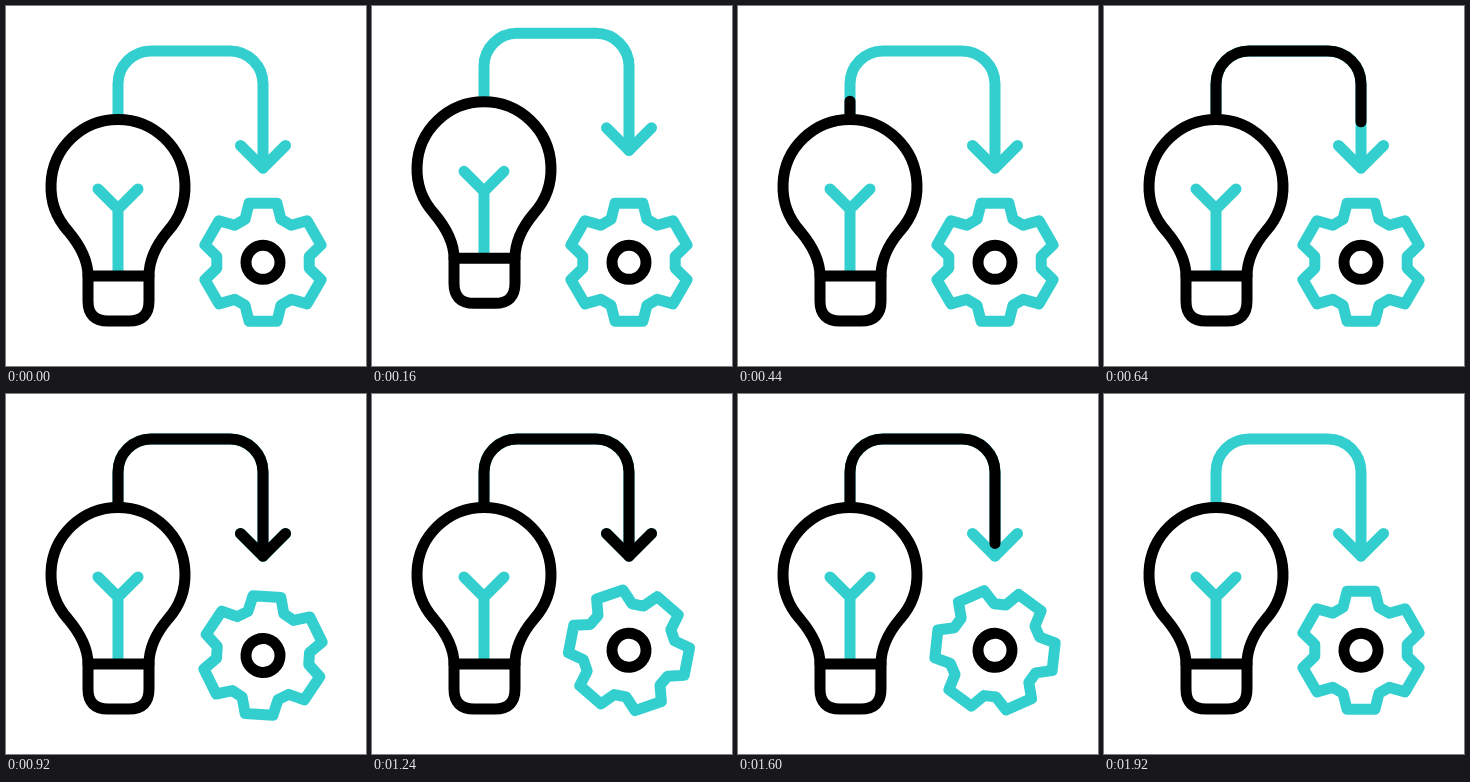
An HTML page with a canvas that plays this animation: 360 px wide and 360 px high, repeating every 2000 ms.

```html
<!DOCTYPE html>
<html lang="en">
<head>
<meta charset="utf-8">
<title>Idea to action</title>
<style>
html, body { margin: 0; width: 100%; height: 100%; overflow: hidden; background: #fff; }
canvas { display: block; width: 100vw; height: 100vh; }
</style>
</head>
<body>
<canvas id="stage"></canvas>
<script>
const SIZE = 360, LOOP = 2000, STEP = 40;
const TEAL = '#33cfcf', BLACK = '#000';
const canvas = document.getElementById('stage');
const ctx = canvas.getContext('2d');
const scale = window.devicePixelRatio || 1;
canvas.width = canvas.height = Math.round(SIZE * scale);

const bulb = new Path2D('M82 270C82 253 73 238 62 225A67 67 0 1 1 162 225C151 238 143 253 143 270');
const base = new Path2D('M82 270V295Q82 315 102 315H123Q143 315 143 295V270Z');
const filament = new Path2D('M112 268V203M92 183L112 203L132 183');
const wire = new Path2D('M112 108V78A33 33 0 0 1 145 45H224A33 33 0 0 1 257 78V162');
const wireLength = 30 + 33 * Math.PI + 79 + 84;
const gear = makeGear(6);

function makeGear(teeth) {
  const path = new Path2D();
  const corners = [[46.6, -22.7], [60.6, -13.3], [60.6, 13.3], [46.6, 22.7]];
  for (let i = 0; i < teeth; i++) {
    for (const [r, deg] of corners) {
      const a = (i * 360 / teeth + deg) * Math.PI / 180;
      path.lineTo(r * Math.sin(a), -r * Math.cos(a));
    }
  }
  path.closePath();
  return path;
}

// Eased 0..1 progress between two times
function ease(t, from, to) {
  const x = Math.min(1, Math.max(0, (t - from) / (to - from)));
  return x * x * (3 - 2 * x);
}

// Rises from a to b, then falls back from b to c
const pulse = (t, a, b, c) => ease(t, a, b) - ease(t, b, c);

function stroke(path, color) {
  ctx.strokeStyle = color;
  ctx.stroke(path);
}

function drawHead(amount, color) {
  if (amount <= 0) return;
  const d = 22.5 * amount;
  const head = new Path2D();
  head.moveTo(257 - d, 162 - d);
  head.lineTo(257, 162);
  head.lineTo(257 + d, 162 - d);
  stroke(head, color);
}

function drawArrow(t) {
  const line = ease(t, 400, 720) - ease(t, 1560, 1880);
  const head = ease(t, 720, 800) - ease(t, 1480, 1560);
  stroke(wire, TEAL);
  drawHead(1, TEAL);
  if (line > 0.001) {
    if (line < 1) ctx.setLineDash([line * wireLength, 1000]);
    stroke(wire, BLACK);
    ctx.setLineDash([]);
  }
  drawHead(head, BLACK);
}

function drawGear(t) {
  ctx.save();
  ctx.translate(257, 256.3 + 8 * pulse(t, 800, 1000, 1200));
  ctx.rotate(ease(t, 800, 1920) * Math.PI * 2 / 3);
  stroke(gear, TEAL);
  ctx.beginPath();
  ctx.arc(0, 0, 17, 0, Math.PI * 2);
  ctx.strokeStyle = BLACK;
  ctx.stroke();
  ctx.restore();
}

function draw(t) {
  ctx.setTransform(canvas.width / SIZE, 0, 0, canvas.height / SIZE, 0, 0);
  ctx.fillStyle = '#fff';
  ctx.fillRect(0, 0, SIZE, SIZE);
  ctx.lineWidth = 11;
  ctx.lineCap = ctx.lineJoin = 'round';

  ctx.save();
  ctx.translate(0, -25 * pulse(t, 40, 227, 413));
  drawArrow(t);
  stroke(filament, TEAL);
  stroke(bulb, BLACK);
  stroke(base, BLACK);
  ctx.restore();

  drawGear(t);
}

const start = performance.now();
function frame() {
  const t = (performance.now() - start) % LOOP;
  draw(Math.floor(t / STEP) * STEP);
  requestAnimationFrame(frame);
}
frame();
</script>
</body>
</html>
```
